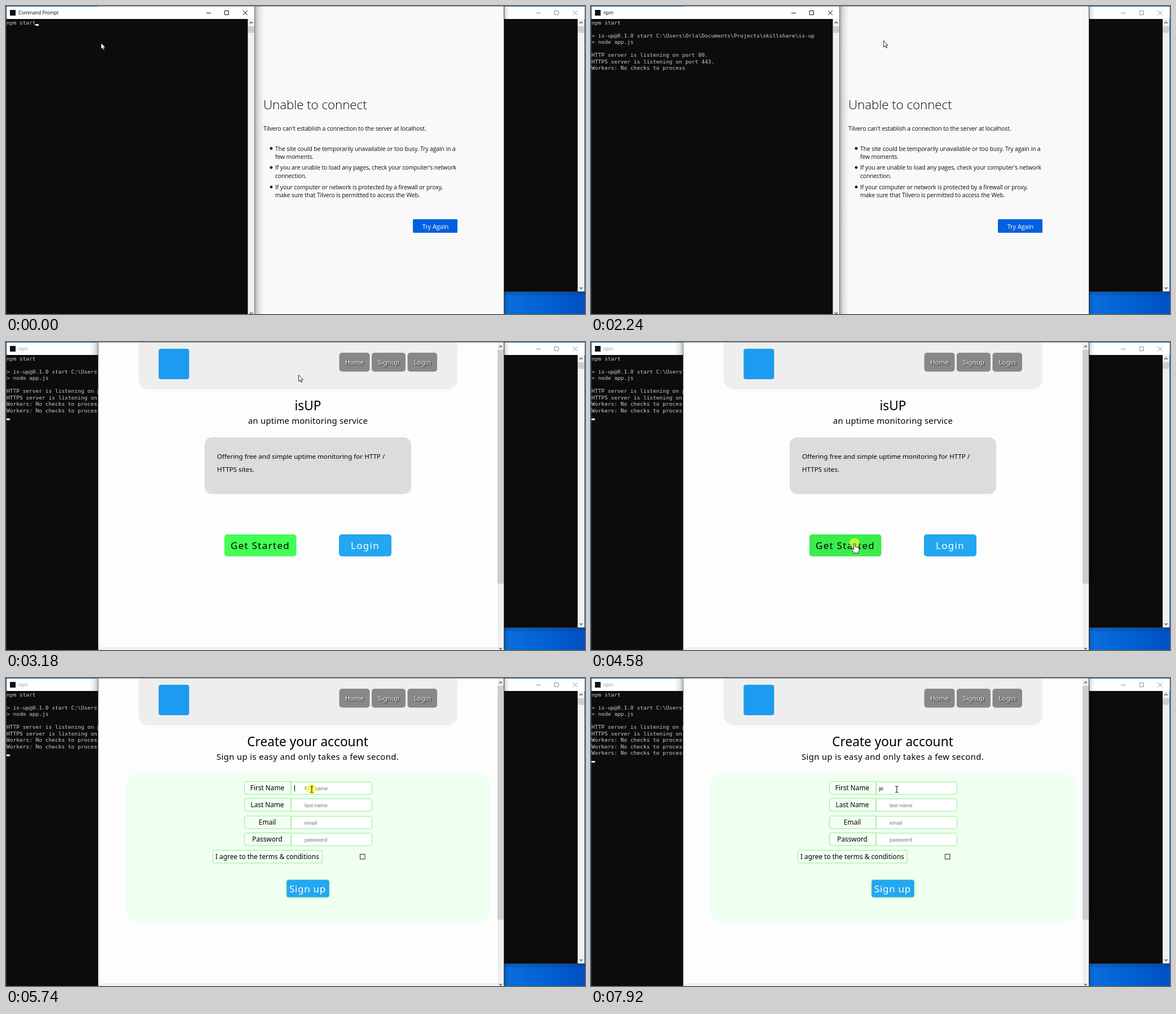
These frames come from a looping animation (1026x546 px, 7990 ms). An HTML page:

```html
<!DOCTYPE html>
<html lang="en">
<head>
<meta charset="utf-8">
<title>Uptime service demo</title>
<style>
  html, body { margin: 0; width: 100%; height: 100%; overflow: hidden; background: #0c0c0c; }
  svg { display: block; }
  text { white-space: pre; }
  .mono { font: 9.53px "DejaVu Sans Mono", monospace; fill: #ccc; }
  .title { font: 8.4px "Open Sans", sans-serif; letter-spacing: -.1px; }
  .err { font: 10.4px "Open Sans", sans-serif; letter-spacing: -.09px; fill: #0c0c0d; }
  .light { font: 300 22.5px "Open Sans", sans-serif; letter-spacing: -.12px; fill: #0c0c0d; }
  .web { font-family: "Noto Sans", sans-serif; fill: #000; }
  .nav { font-size: 11.6px; fill: #fff; text-shadow: 1px 1px 2px #000; }
  .head { font-size: 22.7px; }
  .sub { font-size: 14.9px; }
  .big { font-size: 17px; letter-spacing: 1.3px; }
  .field { font: 9.4px "Liberation Sans", Arial, sans-serif; }
  .hint { fill: #777; }
  .mid { text-anchor: middle; }
</style>
</head>
<body>
<script>
const LOOP = 7990, W = 1026, H = 546;
const PAGE_L = 164, PAGE_R = 882, PAGE_W = PAGE_R - PAGE_L;

const rect = (x, y, w, h, fill, extra = '') =>
  `<rect x="${x}" y="${y}" width="${w}" height="${h}" fill="${fill}" ${extra}/>`;
const text = (x, y, cls, str, extra = '') =>
  `<text x="${x}" y="${y}" class="${cls}" ${extra}>${str}</text>`;
const path = (d, stroke, width = 1, fill = 'none', extra = '') =>
  `<path d="${d}" stroke="${stroke}" stroke-width="${width}" fill="${fill}" ${extra}/>`;
const group = (id, body) => `<g id="${id}">${body}</g>`;
const fade = (id, x2, y2, stops) =>
  `<linearGradient id="${id}" x1="0" y1="0" x2="${x2}" y2="${y2}">` +
  stops.map(([at, color, op = 1]) =>
    `<stop offset="${at}" stop-color="${color}" stop-opacity="${op}"/>`).join('') +
  '</linearGradient>';

const chevron = (x, y, dir) =>
  path(`M${x - 2.5} ${y + dir * 1.3}l2.5 ${-dir * 2.6} 2.5 ${dir * 2.6}`, '#505050', 1.3);

const controls = (x, color) =>
  path(`M${x - 4} 12.5h8M${x + 28.5} 8.5h7v7h-7zM${x + 61} 8l8 8m0 -8l-8 8`, color);

// Console windows
const rowY = row => 32.5 + 11.5 * row;
const output = [
  [0, 0, 'npm start'],
  [2, 1170, '&gt; is-up@0.1.0 start C:\\Users\\Orla\\Documents\\Projects\\skillshare\\is-up'],
  [3, 1170, '&gt; node app.js'],
  [5, 1240, 'HTTP server is listening on port 80.'],
  [6, 1240, 'HTTPS server is listening on port 443.'],
  [7, 1310, 'Workers: No checks to process'],
  [8, 3180, 'Workers: No checks to process'],
  [9, 6750, 'Workers: No checks to process']
];

const scrollbar = (x, top, bottom) =>
  rect(x, top, 12, bottom - top, '#f0f0f0') + rect(x + .5, 36, 11, 11.5, '#cdcdcd') +
  chevron(x + 6, 29.5, 1);

const leftConsole = group('left',
  group('leftShadow', rect(441, 1, 16, 545, 'url(#side)')) +
  rect(0, 0, 441, H, '#0c0c0c') + rect(0, 0, 163.5, 1, '#0063a8') + rect(163.5, 0, 277.5, 1, '#8a8a8a') +
  rect(1, 1, 439.5, 22, '#fff') + rect(0, 1, 1, 545, '#163a50') +
  rect(7, 7, 10, 10, '#111') +
  text(22, 15, 'title', '', 'id="title"') +
  controls(359, '#111') +
  scrollbar(428.5, 23, H) + chevron(434.5, 544.5, -1) + rect(440.5, 1, .7, 545, '#777') +
  output.map(([row, , str], i) => text(1, rowY(row), 'mono', str, `id="line${i}"`)).join('') +
  rect(0, 0, 6, 3, '#f2f2f2', 'id="block"'));

const rightConsole =
  rect(PAGE_R, 1, 143.5, 22, '#fff') + rect(PAGE_R, 23, 143, 484, '#0c0c0c') +
  controls(943.5, '#8a8a8a') + scrollbar(1013, 23, 506) + chevron(1019, 500, -1) +
  rect(PAGE_R, 506, 144, 1, '#3a4550') + rect(PAGE_R, 507, 144, 8, 'url(#down)');

// Connection error page
const blue = '#0b9be8';
const ink = (d, w = 1.6, fill = 'none') => path(d, blue, w, fill, 'stroke-linecap="round" stroke-linejoin="round"');
const cloud = (x, y, s) =>
  `<path transform="translate(${x} ${y}) scale(${s})" fill="#fff" stroke="#ededed" stroke-width=".6" d="M0 10h43q-3-5-9-3-4-5-9-2-6-9-13-2-4 0-4 4-6-1-8 3z"/>`;
const creature =
  cloud(285, 212, 1) + cloud(360, 221, 1.72) +
  path('M285 261.5h31M293 258.5h15M266 299.5h50M388 273.5h23M394 270.5h9M386 318.5h48M399 327.5h19M290 236.5h12', '#e2e2e4', 1.2) +
  '<ellipse cx="345" cy="349.5" rx="40" ry="5.8" fill="#e6e6e8"/>' +
  ink('M322 294l-4 2 0 6-6 1 0 6-6 1 0 6-4 2q1 9 10 13 8 3 18 2z', 1.3, '#c8ecff') +
  ink('M323 264l3-7 6-1 3-5 7 1 6-3 7 1 7-1q9 2 14 9 17 6 19 19 1 13-9 18-3 2-7 3 4 18 0 37l-4 14h-7l-2-8q-12 3-24 0l-2 8h-6l-5-19q-5-18-2-30 3-6 1-13-3-9-2-19z', 1.9, '#fdfdfe') +
  ink('M386 296q-14 4-29-2-6-3-8-8M341 279q7-2 9 6M344 283l-3 3M348 281l-3-4M354 267l6-1M376 269l5-2M354 275q3-4 6 0M377 276q3 3 6-1M380 259l2-3M385 259l3-2', 1.4) +
  ink('M322 304q4-5 9-1l8 6q-2 6-7 4l-8-3M379 301q-7 1-10 8 5 5 9-2M382 300q5 4 3 9M328 317q5 4 10 1', 1.3) +
  ink('M267 322c9-2 18-2 21 3s-10 5-9 9 12 6 20 2 5-15 14-18 11-4 20-7M370 311c12 5 18 9 20 16s7 13 11 9-11-11-9-16 11-2 42-2', 1.2) +
  `<path d="M338 306h4l3 2v5l-3 1h-4zM355 307l4-2 2 2v5l-2 2-4-2z" fill="#075f96"/>`;

const tips = [
  [256.5, 'The site could be temporarily unavailable or too busy. Try again in a'],
  [270.7, 'few moments.'],
  [290.3, 'If you are unable to load any pages, check your computer\'s network'],
  [304.5, 'connection.'],
  [324.8, 'If your computer or network is protected by a firewall or proxy,'],
  [339, 'make sure that Tilvero is permitted to access the Web.']
];
const errorPage = group('error',
  rect(PAGE_L, 1, PAGE_W, 545, '#f9f9fa') + creature +
  text(456, 183, 'light', 'Unable to connect') +
  text(456, 220.5, 'err', 'Tilvero can\'t establish a connection to the server at localhost.') +
  tips.map(([y, str], i) =>
    text(477, y, 'err', str) + (i % 2 ? '' : `<circle cx="470" cy="${y - 4}" r="2.4" fill="#0c0c0d"/>`)).join('') +
  rect(721, 378, 79, 24, '#0060df', 'rx="1.5"') +
  text(761, 394.5, 'err mid', 'Try Again', 'style="font-size:11.1px;fill:#fff"'));

// Web site pages
const navButton = (x, w, str) =>
  rect(x, 19, w, 33.5, '#888', 'rx="5"') + text(x + w / 2, 40, 'web nav mid', str);
const siteFrame = group('site',
  rect(PAGE_L, 1, PAGE_W, 545, '#fdfdfd') +
  path('M235 1H800V66a18 18 0 0 1-18 18H253a18 18 0 0 1-18-18z', 'none', 0, '#eee') +
  rect(270.5, 12, 54, 54, '#1d9bf0', 'rx="4"') +
  navButton(590.5, 54, 'Home') + navButton(648, 60, 'Signup') + navButton(711.5, 52.5, 'Login') +
  rect(871, 1, 11, 545, '#f0f0f0') + rect(871, 14, 11, 414.5, '#cdcdcd') +
  chevron(876.5, 8, 1) + chevron(876.5, 543.5, -1) + rect(PAGE_L, 541, 707, 5, '#f0f0f0'));

const homePage = group('home',
  text(535, 121, 'web head mid', 'isUP') +
  text(535, 145, 'web sub mid', 'an uptime monitoring service', 'letter-spacing=".2"') +
  rect(352, 169, 366, 100.5, '#dcdcdc', 'rx="13"') +
  text(374, 207, 'web', 'Offering free and simple uptime monitoring for HTTP /', 'font-size="11.6"') +
  text(374, 230, 'web', 'HTTPS sites.', 'font-size="11.6"') +
  rect(387, 341, 127.5, 39, '#43ff55', 'rx="5" id="go"') +
  text(398, 366.5, 'web big', 'Get Started') +
  rect(590, 341, 93, 39, '#22a7f0', 'rx="5"') +
  text(611, 366.5, 'web big', 'Login', 'style="fill:#fff"'));

const green = '#90ee90';
const fields = ['First Name', 'Last Name', 'Email', 'Password'];
const fieldY = i => 183.5 + 30.6 * i;
const tag = (x, y, w) =>
  path(`M${x + w} ${y}H${x + 4}q-4 0-4 4v14.5q0 4 4 4H${x + w}z`, green, 1, '#f2fff2');
const formPage = group('form',
  text(534.5, 121, 'web head mid', 'Create your account') +
  text(534.5, 145, 'web sub mid', 'Sign up is easy and only takes a few second.', 'letter-spacing=".37"') +
  rect(212, 169, 646, 263.5, '#effff0', 'rx="22"') +
  fields.map((name, i) => {
    const y = Math.round(fieldY(i)) - .5;
    return tag(422.5, y, 82.5) +
      path(`M505.5 ${y + .7}h138q5 0 5 5v12q0 5-5 5h-138z`, green, 1, '#fff') +
      text(463, y + 15.6, 'web mid', name, 'font-size="11.8"') +
      text(529, y + 15.7, 'field hint', name.toLowerCase(), `id="hint${i}"`);
  }).join('') +
  tag(366.5, 305.5, 193.5) +
  text(371, 321.2, 'web', 'I agree to the terms &amp; conditions', 'font-size="11.87"') +
  rect(627.5, 312.5, 8.5, 8.5, '#fff', 'stroke="#222"') +
  rect(497, 357.5, 76, 31.5, '#22a7f0', `rx="4" stroke="${green}"`) +
  text(502, 380, 'web', 'Sign up', 'font-size="17" letter-spacing=".7" style="fill:#fff"') +
  text(510.5, 199.2, 'field', '', 'id="typed"') +
  rect(511, 190, 1, 11, '#000', 'id="caret"'));

const browser = group('browser',
  rect(PAGE_R, 1, 10, 545, 'url(#side)') + rect(148, 1, 15.5, 22, 'url(#sideBack)') +
  rect(163, 0, PAGE_R - 163, H, '#8c8c8c') + rect(PAGE_R, 0, 1, H, '#3c3c3c') +
  errorPage + siteFrame + homePage + formPage);

const pointer = group('pointer',
  '<circle r="9" fill="#ffff30" fill-opacity=".68" id="glow"/>' +
  path('M.5 .5V11.8l2.6-2.4 1.9 4.1 1.8-.8-1.9-3.9h3.5z', '#111', .9, '#fff', 'id="arrow"') +
  path('M-1.3 1.3q1.3-1.6 2.6 0v5.4l5 1q2 .6 2 2.4l-.6 4-1.5 3.6h-6.7l-4.4-6q-.3-1.8 1.4-1.6l2.2 1.8z', '#111', .9, '#fff', 'id="hand"') +
  path('M-2 -5H.2L.8 -4.4 1.4 -5H3.6M.8 -4.4V5.2M-2 5.8H.2L.8 5.2 1.4 5.8H3.6', '#222', 1.1, 'none', 'id="beam"'));

document.body.innerHTML = `<svg id="stage" width="${W}" height="${H}" viewBox="0 0 ${W} ${H}"><defs>` +
  fade('sky', 1, 0, [[0, '#0a6fdc'], [.5, '#0061d2'], [1, '#0350c4']]) +
  fade('side', 1, 0, [[0, '#000', .28], [.4, '#000', .1], [1, '#000', 0]]) +
  fade('sideBack', 1, 0, [[0, '#000', 0], [.6, '#000', .1], [1, '#000', .28]]) +
  fade('down', 0, 1, [[0, '#000', .16], [1, '#000', 0]]) + '</defs>' +
  rect(0, 0, W, H, '#0063a8') + rect(PAGE_R, 500, 144, 46, 'url(#sky)') +
  rightConsole + browser + leftConsole + pointer + '</svg>';

const el = {};
document.querySelectorAll('[id]').forEach(node => el[node.id] = node);
const show = (node, on) => node.setAttribute('display', on ? 'inline' : 'none');
const within = (t, a, b) => t >= a && t < b;

// Pointer: start time, step length, steps, target
const moves = [
  [1860, 76, 6, 518, 61],
  [3180, 1, 1, 518, 58],
  [3630, 83.3, 7, 467, 356.5],
  [5050, 76.6, 9, 541, 197]
];
const ease = p => p * p * (3 - 2 * p);

function pointerAt(t) {
  let x = 168, y = 65;
  for (const [start, step, count, tx, ty] of moves) {
    if (t < start) break;
    const p = ease(Math.min(1, (Math.floor((t - start) / step) + 1) / count));
    x += (tx - x) * p;
    y += (ty - y) * p;
  }
  return [x, y];
}

// Console block: from time, row, x
const blocks = [[0, 0, 52], [460, 1, 1], [1000], [1170, 4, 1], [1240, 7, 1],
  [1310, 8, 1], [1936], [3180, 9, 1], [6750, 10, 1]];

function draw(t) {
  const front = t >= 2410, loaded = t >= 3180, form = t >= 4820;
  const top = front ? el.browser : el.left;
  if (el.pointer.previousSibling !== top) el.stage.insertBefore(top, el.pointer);

  el.title.textContent = t < 540 ? 'Command Prompt' : 'npm';
  el.title.setAttribute('fill', front ? '#999' : '#000');
  show(el.leftShadow, !front);
  output.forEach(([, from], i) => show(el['line' + i], t >= from));
  const [, row, x] = blocks.filter(b => t >= b[0]).pop();
  show(el.block, row !== undefined);
  if (row !== undefined) {
    el.block.setAttribute('x', x);
    el.block.setAttribute('y', 32 + 11.5 * row);
  }

  show(el.error, !loaded);
  show(el.site, loaded);
  show(el.home, loaded && !form);
  show(el.form, form);

  const [px, py] = pointerAt(t);
  const onButton = loaded && !form && px > 387 && px < 514 && py > 341 && py < 380;
  const onField = form && px > 505 && px < 648 &&
    fields.some((_, i) => py > fieldY(i) && py < fieldY(i) + 23);
  el.pointer.setAttribute('transform', `translate(${px} ${py})`);
  show(el.arrow, !onButton && !onField);
  show(el.hand, onButton);
  show(el.beam, onField);
  show(el.glow, within(t, 2410, 2570) || within(t, 4580, 4730) || within(t, 5740, 5910));
  el.go.setAttribute('fill', onButton ? '#3cec4d' : '#43ff55');

  const typed = t < 7590 ? '' : t < 7840 ? 'j' : 'jo';
  el.typed.textContent = typed;
  show(el.hint0, !typed);
  el.caret.setAttribute('x', [511, 514, 519][typed.length]);
  show(el.caret, within(t, 5740, 6290) || within(t, 6830, 7380) || within(t, 7590, 7920));
}

const begin = performance.now();
function tick() {
  draw((performance.now() - begin) % LOOP);
  requestAnimationFrame(tick);
}
tick();
</script>
</body>
</html>
```
